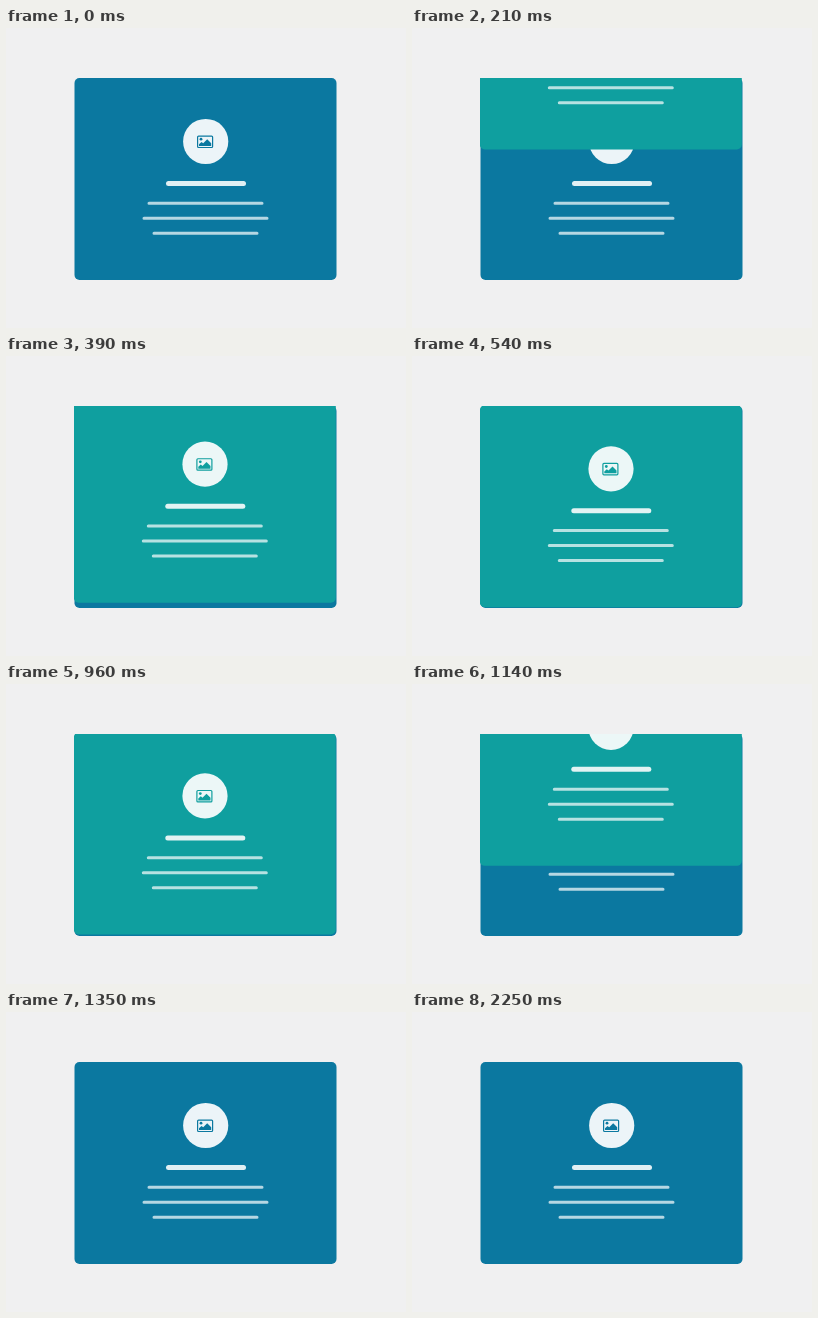
An HTML page that plays this animation: 400x300 px, repeating every 2280 ms.

```html
<!DOCTYPE html>
<html lang="en">
<head>
<meta charset="utf-8">
<title>Sliding card</title>
<style>
  html, body { margin: 0; width: 100%; height: 100%; overflow: hidden; background: #f0f0f1; }
  svg { display: block; width: 100%; height: 100%; }
</style>
</head>
<body>
<svg viewBox="0 0 400 300">
  <defs>
    <clipPath id="window"><rect x="68" y="50" width="262.5" height="202"/></clipPath>
    <g id="card">
      <rect x="68.5" y="50" width="262" height="202" rx="5" fill="currentColor"/>
      <circle cx="199.7" cy="113.5" r="22.6" fill="#fff" fill-opacity=".92"/>
      <rect x="191.6" y="108.1" width="15" height="11.4" rx="1" fill="none" stroke="currentColor" stroke-width="1.2"/>
      <circle cx="195" cy="111.2" r="1.4" fill="currentColor"/>
      <path d="M193 118v-1.8l2.5-2.3 1.7 1.4 4-4 4 4V118z" fill="currentColor"/>
      <g fill="none" stroke="#fff" stroke-linecap="round">
        <path d="M162.5 155.5H237.5" stroke-width="5" stroke-opacity=".88"/>
        <path d="M143 175.3H256M138 190.3H261M148 205.3H251" stroke-width="3" stroke-opacity=".7"/>
      </g>
    </g>
  </defs>
  <use href="#card" color="#0b78a0"/>
  <g clip-path="url(#window)"><use id="cover" href="#card" color="#0f9f9f"/></g>
</svg>
<script>
const LOOP = 2280, SLIDE = 500, ENTER = -14, LEAVE = 919, TRAVEL = 204;
const cover = document.getElementById('cover');

// cubic-bezier(.77, 0, .175, 1), solved by bisection
function ease(x) {
  if (x <= 0) return 0;
  if (x >= 1) return 1;
  let lo = 0, hi = 1;
  for (let i = 0; i < 24; i++) {
    const s = (lo + hi) / 2, u = 1 - s;
    if (3 * u * u * s * .77 + 3 * u * s * s * .175 + s ** 3 < x) lo = s;
    else hi = s;
  }
  return lo * lo * (3 - 2 * lo);
}

function draw(now) {
  const t = now % LOOP;
  const shown = ease((t - ENTER) / SLIDE) - ease((t - LEAVE) / SLIDE);
  cover.setAttribute('transform', `translate(-.7 ${-.7 - TRAVEL * (1 - shown)})`);
}

const start = performance.now();
function tick() {
  draw(performance.now() - start);
  requestAnimationFrame(tick);
}
tick();
</script>
</body>
</html>
```
